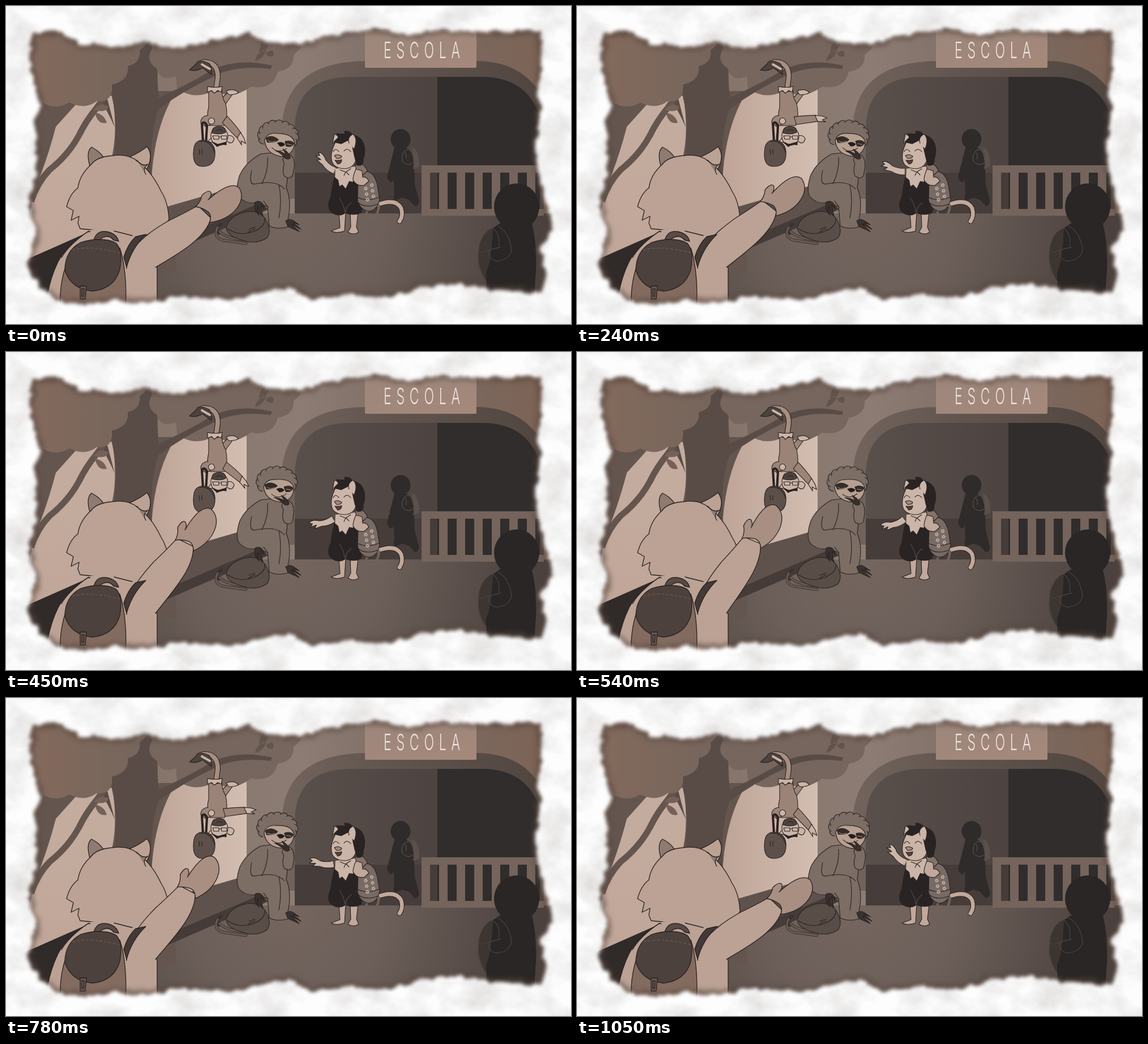
Recreate the animation shown at these times as an HTML page. Size 998x561 px, loop 1.08 s.

```html
<!DOCTYPE html>
<html lang="pt">
<head>
<meta charset="utf-8">
<title>Escola</title>
<style>
html,body{margin:0;width:100%;height:100%;overflow:hidden;background:#fff}
svg{position:absolute;left:0;top:0;width:998px;height:561px;will-change:transform}
.ink{stroke:#2a2220;stroke-width:1.3;stroke-linejoin:round;stroke-linecap:round}
.fine{stroke-width:1.1}
.line{fill:none}
.fur{fill:#bba295}
.sloth{fill:#7c6d65}
.pale{fill:#cbb5a8}
.monkey{fill:#9b8477}
.dark{fill:#292423}
</style>
</head>
<body>
<svg viewBox="0 0 998 561">
  <defs>
    <linearGradient id="wall" x2="1" y2="0">
      <stop stop-color="#84695b"/><stop offset=".3" stop-color="#87766c"/>
      <stop offset=".52" stop-color="#8d7c73"/><stop offset=".75" stop-color="#7a6a62"/>
      <stop offset="1" stop-color="#7d6152"/>
    </linearGradient>
    <radialGradient id="floor" gradientUnits="userSpaceOnUse" cx="500" cy="370" r="430">
      <stop stop-color="#75665f"/><stop offset=".4" stop-color="#6c5f59"/><stop offset="1" stop-color="#4b413e"/>
    </radialGradient>
    <linearGradient id="arch" x2="1" y2="0">
      <stop stop-color="#72645d"/><stop offset=".4" stop-color="#62554f"/><stop offset="1" stop-color="#50453f"/>
    </linearGradient>
    <linearGradient id="hall" x2="1" y2="0">
      <stop stop-color="#594f4b"/><stop offset=".5" stop-color="#4e4542"/><stop offset="1" stop-color="#443c3a"/>
    </linearGradient>
    <linearGradient id="sky" x2="0" y2="1">
      <stop stop-color="#c4ada0"/><stop offset="1" stop-color="#c0a699"/>
    </linearGradient>
    <linearGradient id="sky2" x2="1" y2="0">
      <stop stop-color="#bea497"/><stop offset="1" stop-color="#d3beb2"/>
    </linearGradient>
    <linearGradient id="leaves" x2="1" y2="0">
      <stop stop-color="#846a5c"/><stop offset="1" stop-color="#75655c"/>
    </linearGradient>
    <linearGradient id="sign" x2="1" y2="1">
      <stop stop-color="#9c867b"/><stop offset="1" stop-color="#a5897b"/>
    </linearGradient>
  </defs>
  <rect width="998" height="561" fill="url(#wall)"/>
  <path d="M0 366H998V561H0Z" fill="url(#floor)"/>

  <!-- archway -->
  <path d="M487 340V215Q492 97 640 97H830Q915 97 950 165V366H510V340Z" fill="url(#arch)"/>
  <path d="M510 366V215Q512 125 610 125H840Q920 125 943 195V366Z" fill="url(#hall)"/>
  <path d="M510 294H762V366H510Z" fill="#463d3a"/>
  <path d="M762 125H840Q920 125 943 195V366H762Z" fill="#302d2c"/>
  <rect x="634" y="44" width="197" height="65" rx="2" fill="url(#sign)"/>
  <text transform="translate(667 92) scale(.58 1)" font-family="Inter,Roboto,sans-serif" font-weight="300" font-size="40" letter-spacing="15" fill="#eee5df">ESCOLA</text>

  <!-- distant pupil -->
  <g fill="#2f2b2a">
    <ellipse cx="697" cy="235" rx="17.500" ry="18"/>
    <path d="M686 250Q698 244 711 252Q722 262 721 285L722 315L728 338Q733 351 722 353L712 342L700 338L688 343Q682 338 686 332L685 305Q682 315 676 308Q671 302 675 294Z"/>
  </g>
  <path d="M716 249Q731 253 730 283L719 288Q723 265 716 249" fill="#5b504b"/>
  <path d="M704 256Q712 249 717 257L721 275Q711 285 700 274Q698 262 704 256M704 257Q709 262 706 270" class="line" stroke="#5f5550"/>

  <g id="railing" fill="#74645b"></g>

  <!-- near pupil -->
  <path d="M861 391Q840 398 835 428Q831 460 849 486L862 440Z" fill="#3d3532"/>
  <g fill="#292625">
    <ellipse cx="902" cy="354" rx="40" ry="41"/>
    <path d="M873 383Q900 398 929 384Q940 430 935 480L932 535H850L848 470Q858 450 860 392Z"/>
  </g>
  <path d="M861 391Q840 398 835 428Q836 438 848 432L874 425M868 388Q889 398 893 430Q890 448 866 450Q850 446 853 431M860 392Q874 403 870 424M835 436Q830 460 846 482" class="line" stroke="#4a423f" stroke-width="1.300"/>

  <!-- window views and tree -->
  <path d="M0 150H300V470H0Z" fill="#64564f"/>
  <path d="M30 449L48 330Q72 275 88 213L125 172L188 158Q198 225 186 270L288 360L150 405Z" fill="url(#sky)"/>
  <path d="M163 160L178 160L192 214Q182 190 163 160" fill="#594c47"/>
  <path d="M257 368Q250 225 304 145L330 120H425V313Z" fill="url(#sky2)"/>
  <path d="M150 397L288 353L430 312L445 350L268 428L250 561H150Z" fill="#5f524c"/>
  <path d="M30 450L150 397V561H30Z" fill="#302a29"/>
  <path d="M262 427L452 346L463 359L262 446Z" fill="#453b38"/>
  <path d="M187 50H275Q262 115 272 175Q252 225 258 310H184Q202 220 187 160Z" fill="#594c47"/>
  <path d="M176 158L160 180Q141 203 129 228Q110 263 77 289Q55 312 44 345" class="line" stroke="#64554e" stroke-width="11"/>
  <path d="M20 30H252Q264 58 236 78Q239 100 215 106Q218 132 186 139Q190 171 160 168Q139 184 112 170Q88 185 62 169Q40 170 30 150Z" fill="url(#leaves)"/>
  <path d="M252 30H520Q537 65 508 86Q510 111 480 116Q472 149 433 142Q402 166 366 150Q330 167 302 145L300 124Q273 135 266 110Q245 97 258 75Z" fill="#76665d"/>
  <path d="M262 165Q320 140 365 112Q411 91 470 105L468 111Q406 104 370 123Q315 148 268 183Z" fill="#594c47"/>
  <g fill="#62544d">
    <path d="M440 97Q455 93 460 77Q443 80 440 97M447 81Q449 62 463 54Q471 64 456 80ZM459 83Q476 72 472 89Q462 91 459 83"/>
    <path d="M155 184Q164 169 181 177Q179 189 155 184M157 188Q174 191 178 206Q162 210 157 188" fill="#766158"/>
  </g>
</svg>

<svg viewBox="0 0 998 561">
  <!-- monkey -->
  <g class="ink fine">
    <path d="M348 99Q375 98 374 126L371 147" class="line" style="stroke-width:10"/>
    <path d="M348 99Q375 98 374 126L371 147" class="line" style="stroke:#a68e81;stroke-width:7.800"/>
    <path d="M358 101Q339 92 336 102L324 113Q337 116 347 109L363 121Q364 105 358 101" fill="#4c423e"/>
    <path d="M346 103L360 111" class="line" style="stroke:#cbb5a8;stroke-width:4"/>
    <path d="M380 164L393 151L400 156L387 174Z" class="monkey"/>
    <path d="M389 150Q402 144 411 153Q402 158 393 156Z" class="pale"/>
    <path d="M358 148Q370 155 381 148Q382 164 388 172Q393 195 386 211H360Q353 197 358 178Z" class="monkey"/>
    <path d="M356 142Q370 145 382 142L380 152L374 149L368 154L363 149L356 152Z" class="pale"/>
    <path d="M357 193Q344 194 344 206L353 213L363 208" class="monkey"/>
    <g id="monkeyArm">
      <path d="M384 195Q405 194 423 196L425 207Q405 208 387 209Z" class="monkey"/>
      <path d="M421 196L433 198L442 202L433 205L439 209L425 207Z" class="pale"/>
    </g>
    <path d="M390 229Q400 227 403 234Q400 246 391 239M363 232L356 240L366 241" class="pale"/>
    <path d="M362 226Q365 213 378 215Q391 216 392 230Q391 245 376 246Q361 244 362 226" class="pale"/>
    <path d="M364 224Q363 213 376 212Q389 213 388 223Q377 228 364 224" fill="#4d423e"/>
    <path d="M365 240L374 244L389 240L389 245L380 244L373 248Z" class="dark"/>
    <path d="M365 229H376V235H367ZM380 229H390V235H381ZM376 231H380M372 220Q377 216 382 220" class="line"/>
    <path d="M348 240L346 208Q350 202 355 211L353 245" class="line" style="stroke-width:4"/>
    <path d="M332 250Q335 235 351 237Q370 241 369 264Q367 284 346 283Q327 282 332 250" fill="#5d504a"/>
    <path d="M342 239Q360 235 369 259Q369 243 354 237M341 253L342 262M346 253L346 261" class="line"/>
    <circle cx="363" cy="203" r="5.500" class="pale"/>
  </g>

  <!-- sloth -->
  <g class="ink fine">
    <path d="M374 390Q365 407 382 413L424 419M377 398Q391 411 427 413M380 385Q367 393 376 401" class="line" style="stroke:#3a312e;stroke-width:5"/>
    <path d="M374 390Q365 407 382 413L424 419M377 398Q391 411 427 413" class="line" style="stroke:#6a5c55;stroke-width:3"/>
    <path d="M389 391Q393 372 420 364Q448 358 459 377Q470 396 461 409Q440 423 411 411Q390 404 389 391Z" fill="#594d48"/>
    <path d="M391 393Q413 407 437 398Q459 389 457 374M429 394L440 390M428 399L440 393" class="line"/>
    <path d="M450 261Q424 275 413 298Q404 325 412 337Q423 350 445 347L462 354L465 388Q481 396 503 388L498 377Q505 343 495 320Q499 302 494 277L488 257Z" class="sloth"/>
    <path d="M434 290Q428 316 440 314Q478 306 492 323M482 315Q488 343 482 374M462 267Q464 289 452 314M455 344L463 355" class="line"/>
    <path d="M440 346Q449 342 454 350L456 358Q452 353 450 350Q451 361 454 371Q444 362 445 352Q442 360 447 369Q437 359 440 346" fill="#3a3230"/>
    <path d="M494 379Q502 374 508 379L518 386L507 382L521 394L503 384L518 398L498 389Z" fill="#3a3230"/>
    <g id="slothHead">
      <g id="curls" class="sloth"></g>
      <ellipse cx="478" cy="230" rx="32" ry="24.500" class="sloth" style="stroke:none"/>
      <path d="M455 239Q458 224 477 225Q505 223 508 240Q508 260 487 265Q459 263 455 239" fill="#b79f91"/>
      <path d="M457 235Q467 227 479 236Q474 242 460 242ZM491 238Q501 234 507 240Q503 248 494 246Z" fill="#332c2a"/>
      <path d="M478 242Q485 238 491 243Q489 247 483 247Z" fill="#211c1b"/>
      <path d="M469 251Q481 261 495 250" class="line"/>
      <path d="M461 239Q467 243 474 239M495 242L503 243" class="line" style="stroke:#a18a7e"/>
    </g>
    <g id="slothHand">
      <path d="M487 272Q488 262 498 262Q509 266 508 285L506 299Q500 307 491 300Q487 291 490 279Z" class="sloth"/>
      <path d="M489 267Q482 260 473 257Q484 257 492 263L486 253Q497 258 500 268Q495 273 489 267" fill="#39302e"/>
    </g>
  </g>

  <!-- opossum -->
  <g class="ink fine">
    <path d="M655 351Q688 338 698 357Q702 370 695 380" class="line" style="stroke-width:9"/>
    <path d="M655 351Q688 338 698 357Q702 370 695 380" class="line" style="stroke:#c1a89b;stroke-width:6.800"/>
    <path d="M588 364L590 391L574 397Q584 402 598 397L600 365ZM608 365L609 390L604 399Q614 405 623 399L619 390L622 364Z" fill="#c1a89b"/>
    <path d="M638 361Q632 377 643 376Q657 373 659 352" class="line" style="stroke:#70625a;stroke-width:4"/>
    <path d="M583 292Q577 311 574 336Q565 356 575 364Q588 373 599 365Q616 371 627 364Q634 344 624 315L620 292Z" class="dark"/>
    <path d="M589 339Q596 349 599 364M600 365Q599 354 610 347" class="line" style="stroke:#574c47"/>
    <path d="M582 287L618 283L622 297L614 301L613 310L606 309L600 322L594 315L589 318L587 307L581 302Z" class="pale" style="stroke:none"/>
    <path d="M617 280Q631 273 639 292L636 309L622 311Z" fill="#82726a"/>
    <path d="M637 292Q651 294 656 316L660 341Q656 361 640 362Q624 358 621 342L622 307Z" fill="#786a64"/>
    <path d="M622 338Q638 346 660 337M622 347Q636 358 658 349" class="line"/>
    <g id="flowers" fill="#c1aea3" stroke="none"></g>
    <path d="M618 288Q613 299 613 307Q620 319 633 316L641 309Q637 300 630 302L629 291Q622 288 618 288Z" fill="#c1a89b"/>
    <path d="M577 242L580 226Q590 229 594 240Z" class="pale"/>
    <path d="M581 242Q590 225 606 234Q622 242 619 266Q617 286 598 287Q577 286 575 271Q573 258 581 242" class="pale"/>
    <path d="M579 240L587 232L584 225L599 226L598 221Q609 220 611 227Q628 230 632 244Q636 257 631 270Q632 283 620 281L616 267L612 249Q617 236 604 237L592 243Z" class="dark"/>
    <path d="M606 242Q602 232 613 226Q622 234 615 252" class="pale"/>
    <path d="M580 264Q586 260 593 265Q593 269 584 269Z" fill="#a08a7f"/>
    <path d="M581 272Q588 273 593 271Q593 278 586 279Z" fill="#5b4039"/>
    <path d="M578 257Q582 249 588 257M597 256Q602 249 609 257M590 289L600 293L609 287M600 293L597 299M601 293L606 298" class="line"/>
    <g id="opossumArm">
      <path d="M578 296Q565 290 559 280L549 272L556 271L547 264L554 264L552 258Q561 259 565 272Q573 282 583 285" class="pale"/>
    </g>
  </g>

  <!-- foreground pupil -->
  <g class="ink">
    <path d="M145 398Q108 421 92 451Q72 492 69 545H267V463L250 404Z" class="fur"/>
    <path d="M148 282Q141 257 151 249Q167 257 174 270Z" fill="#8f7b71"/>
    <path d="M214 268Q236 259 249 248Q263 266 245 294Z" class="fur"/>
    <path d="M150 280Q160 266 188 264Q217 260 232 274Q257 291 274 327Q286 345 288 376Q275 402 234 406Q175 397 131 393L127 383L129 371L115 378L119 361L107 354Q113 331 127 321Q130 298 150 280Z" class="fur"/>
    <path d="M231 272Q241 284 251 279Q240 286 247 297" fill="#8f7b71"/>
    <path d="M149 395Q190 390 250 407L255 452H150Z" class="fur" style="stroke:none"/>
    <path d="M146 397Q111 421 98 444M191 397L223 405" class="line"/>
    <path id="arm" class="fur"/>
    <path id="hand" fill="#a88f82"/>
    <path d="M247 403Q222 427 213 461L208 443Q215 420 229 407Z" fill="#433936"/>
    <path d="M105 460Q92 500 97 545H211Q215 469 201 427Z" fill="#846b5f"/>
    <path d="M155 413Q160 395 178 398Q195 401 199 415L190 413Q180 400 164 413Z" fill="#594b45"/>
    <path d="M104 466Q104 432 132 417Q170 406 194 418Q207 430 201 465Q191 499 153 503Q114 499 104 466Z" fill="#4c413d"/>
    <path d="M118 430Q150 422 203 436" class="line" style="stroke:#73564a;stroke-dasharray:4 4"/>
    <path d="M131 494H142L140 517H131ZM134 499H138L137 512H134Z" fill="#655751"/>
  </g>
</svg>

<svg viewBox="0 0 998 561">
  <defs>
    <filter id="paper" filterUnits="userSpaceOnUse" x="-30" y="-30" width="1060" height="625" color-interpolation-filters="sRGB">
      <feTurbulence type="fractalNoise" baseFrequency=".06" numOctaves="3" seed="8" result="grain"/>
      <feDisplacementMap in="SourceGraphic" in2="grain" scale="15" xChannelSelector="R" yChannelSelector="G"/>
      <feGaussianBlur stdDeviation="3" result="torn"/>
      <feTurbulence type="fractalNoise" baseFrequency=".014 .02" numOctaves="4" seed="3"/>
      <feColorMatrix values="0 0 0 0 .86 0 0 0 0 .85 0 0 0 0 .845 1.6 0 0 0 -.62" result="cloud"/>
      <feComposite in="cloud" in2="torn" operator="atop"/>
    </filter>
    <filter id="scorch" filterUnits="userSpaceOnUse" x="-30" y="-30" width="1060" height="625" color-interpolation-filters="sRGB">
      <feTurbulence type="fractalNoise" baseFrequency=".06" numOctaves="3" seed="8" result="grain"/>
      <feDisplacementMap in="SourceGraphic" in2="grain" scale="15" xChannelSelector="R" yChannelSelector="G"/>
      <feGaussianBlur stdDeviation="4"/>
    </filter>
  </defs>
  <path id="rim" fill="none" stroke="#55443b" stroke-opacity=".6" stroke-width="14" filter="url(#scorch)"/>
  <path id="border" fill="#fdfdfd" fill-rule="evenodd" filter="url(#paper)"/>
</svg>

<script>
const $ = id => document.getElementById(id);
const range = n => [...Array(n).keys()];

const tear = 'M46 46L100 46L130 67L210 71L245 62L285 72L335 69L385 57L430 48L460 63L520 67L560 55L640 39L720 51L770 41L850 45L946 43' +
  'L948 90L938 150L945 180L935 260L950 330L966 392L945 430L955 480L943 506' +
  'L860 500L800 490L730 498L680 514L600 510L540 518L500 496L460 505L400 519L350 515L310 512L250 524L195 520L140 526L90 520' +
  'L60 496L38 460L52 400L38 345L54 300L50 200L60 170L42 110Z';
$('rim').setAttribute('d', tear);
$('border').setAttribute('d', 'M-30-30H1030V595H-30Z' + tear);

$('railing').innerHTML = '<path d="M734 281H950V294H734ZM734 358H950V370H734Z"/>' +
  range(7).map(i => `<rect x="${734 + i * 31}" y="290" width="15" height="72"/>`).join('');

$('curls').innerHTML = range(11).map(i => {
  const a = (155 + i * 23) * Math.PI / 180;
  return `<circle cx="${478 + 28 * Math.cos(a)}" cy="${229 + 19.5 * Math.sin(a)}" r="8.500"/>`;
}).join('');

$('flowers').innerHTML = range(7).map(i => {
  const x = 634 + i % 2 * 12 + (i >> 1) * 1.5, y = 312 + (i >> 1) * 10 + i % 2 * 4;
  return range(5).map(k => {
    const a = k * Math.PI * .4;
    return `<circle cx="${x + 2.2 * Math.cos(a)}" cy="${y + 2.2 * Math.sin(a)}" r="1.300"/>`;
  }).join('');
}).join('');

const ease = u => (1 - Math.cos(Math.PI * Math.min(1, Math.max(0, u)))) / 2;
// Eases 0 to 1 between start and peak, then back to 0 at end.
const swing = (t, start, peak, end) =>
  t < peak ? ease((t - start) / (peak - start)) : ease((end - t) / (end - peak));
const turn = (id, angle, x, y) => $(id).setAttribute('transform', `rotate(${angle} ${x} ${y})`);

function drawWave(angle) {
  const c = Math.cos(angle), s = Math.sin(angle), px = 247, py = 458;
  const r = (x, y) => [px + (x - px) * c - (y - py) * s, py + (x - px) * s + (y - py) * c]
    .map(v => v.toFixed(1)).join(' ');
  $('arm').setAttribute('d', `M213 463C214 427 ${r(250, 400)} ${r(287, 379)}Q${r(320, 363)} ${r(339, 352)}` +
    `L${r(362, 374)}C${r(353, 410)} ${r(305, 437)} 264 461`);
  $('hand').setAttribute('d', `M${r(335, 354)}Q${r(344, 346)} ${r(346, 334)}Q${r(358, 323)} ${r(362, 329)}` +
    `Q${r(363, 337)} ${r(357, 342)}C${r(375, 326)} ${r(399, 309)} ${r(412, 321)}` +
    `C${r(426, 344)} ${r(402, 376)} ${r(360, 382)}Q${r(364, 369)} ${r(357, 363)}Q${r(345, 355)} ${r(335, 354)}Z`);
}

function draw(t) {
  drawWave(-22.5 * swing(t, 30, 630, 1050) * Math.PI / 180);
  const lower = swing(t, 0, 550, 1060);
  turn('opossumArm', -63 * lower, 583, 295);
  turn('monkeyArm', 49 - 55 * swing(t % 540, 0, 215, 530), 388, 202);
  turn('slothHead', 5 - 5 * lower, 480, 260);
  turn('slothHand', 4 - 4 * lower, 500, 300);
}

const begin = performance.now();
(function tick() {
  const t = (performance.now() - begin) % 1080;
  draw(Math.floor(t / 30) * 30);
  requestAnimationFrame(tick);
})();
</script>
</body>
</html>
```
